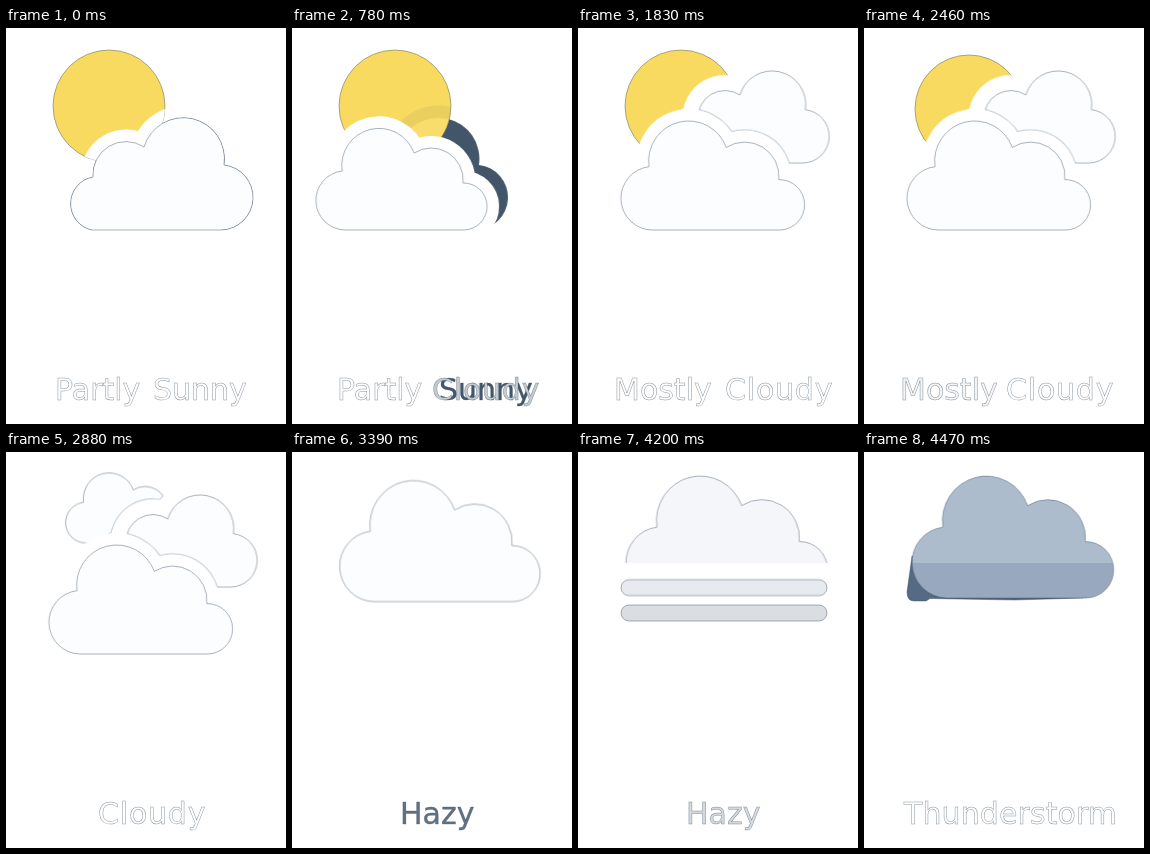
These frames come from a looping animation (280 by 396 pixels, 4500 ms). An HTML page:

```html
<!DOCTYPE html>
<html lang="en">
<head>
<meta charset="utf-8">
<title>Weather icons</title>
<style>
  html, body { margin: 0; width: 100%; height: 100%; overflow: hidden; background: #fff; }
  svg { display: block; width: 280px; height: 396px; }
  path, circle, rect { vector-effect: non-scaling-stroke; }
  .edge { stroke: #34495e; stroke-opacity: .6; stroke-width: .7; }
  text { font: 30px "DejaVu Sans", Verdana, sans-serif; stroke: #34495e; stroke-opacity: .6; stroke-width: .5; }
</style>
</head>
<body>
<svg viewBox="0 0 280 396">
  <defs>
    <clipPath id="inSun"><circle cx="103" cy="78" r="56"/></clipPath>
    <clipPath id="upper"><rect width="280" height="111"/></clipPath>
    <clipPath id="lower"><rect y="111" width="280" height="60"/></clipPath>
  </defs>
  <g id="low"></g>
  <g id="mid"></g>
  <g id="high"></g>
  <g id="haze"></g>
  <g id="words"></g>
</svg>
<script>
const LOOP = 4500, NAVY = '#34495e', WHITE = '#fff', SNOW = '#fcfdfe';
const [low, mid, high, haze, words, defs] =
  ['#low', '#mid', '#high', '#haze', '#words', 'defs'].map(s => document.querySelector(s));
const running = [];

function make(parent, tag, attrs = {}) {
  const el = document.createElementNS('http://www.w3.org/2000/svg', tag);
  for (const k in attrs) el.setAttribute(k, attrs[k]);
  return parent.appendChild(el);
}

// rows: [time in ms, value, easing towards the next row]
function anim(el, prop, ...rows) {
  // one row only at each end of the loop
  const start = rows.filter(r => r[0] === 0).pop() || [0, rows[0][1]];
  const end = rows.find(r => r[0] === LOOP) || [LOOP, rows[rows.length - 1][1]];
  const inner = rows.filter(r => r[0] > 0 && r[0] < LOOP);
  running.push(el.animate(
    [start, ...inner, end].map(([t, v, easing = 'linear']) => ({ offset: t / LOOP, [prop]: v, easing })),
    { duration: LOOP, iterations: Infinity, fill: 'both' }));
}

// times: on, off, on, off ... as hard switches
function show(el, ...times) {
  anim(el, 'opacity', ...times.flatMap((t, i) => [[t, i % 2], [t, 1 - i % 2]]));
}

function fade(el, [in0, in1, out0, out1]) {
  anim(el, 'opacity', [in0, 0], [in1, 1], [out0, 1], [out1, 0]);
}

const at = (x, y, sx = 1, sy = sx) => `translate(${x}px, ${y}px) scale(${sx}, ${sy})`;

// outline from its lower left, then arcs [radius, x, y]
const outline = (x, arcs) =>
  `M${x} 0` + arcs.map(([r, px, py]) => `A${r} ${r} 0 0 1 ${px} ${py}`).join('') + 'Z';
const peakRight = outline(27, [[27, 28, -53], [33, 79, -83], [41.1, 159, -65], [32.6, 156, 0]]);
const peakLeft = outline(30, [[29.6, 27, -59], [37.3, 99, -77], [32, 148, -47], [23.5, 149, 0]]);

// Navy body below the sun, white body above it, with a clear gap around
function cloud(id, d, times, poses, under) {
  const base = make(low, 'path', { d, fill: NAVY });
  const group = make(high, 'g');
  const clip = make(make(defs, 'clipPath', { id }), 'path', { d });
  const parts = [base, clip];
  let line;
  if (under) {
    const g = make(group, 'g', { 'clip-path': `url(#${under.id})` });
    line = make(g, 'path', { d, fill: 'none', stroke: '#9aa8b6', 'stroke-width': 25 });
    fade(line, under.times);
    parts.push(line);
  }
  const wrap = make(group, 'g');
  const ring = make(wrap, 'path', { d, fill: 'none', stroke: WHITE, 'stroke-width': 24 });
  parts.push(ring, make(group, 'path', { d, fill: SNOW, class: 'edge' }));
  parts.forEach(p => anim(p, 'transform', ...poses));
  fade(group, times);
  show(base, times[0], times[3]);
  return { id, times, wrap, ring, line };
}

const sun = make(mid, 'circle', { r: 56, fill: '#f9da60', class: 'edge' });
anim(sun, 'transform', [2250, at(103, 78), 'ease-in'], [2460, at(105, 81, .965), 'ease-in'],
  [2640, at(110, 90, 0)]);
show(sun, 0, 2640);

const first = cloud('first', peakRight, [0, 0, 600, 795],
  [[600, at(59, 202)], [780, at(28, 202)], [795, at(26, 202)]]);
first.wrap.setAttribute('clip-path', 'url(#inSun)');
anim(first.ring, 'stroke', [600, WHITE], [600, NAVY]);

const third = cloud('third', peakLeft, [2490, 2670, 3120, 3300],
  [[2490, at(33, 82, .69), 'ease-out'], [2820, at(59, 91, .69)],
   [3120, at(59, 91, .69)], [3300, at(55, 84, .69)]]);

const back = cloud('back', peakRight, [810, 990, 3120, 3330],
  [[810, at(139, 143, .65), 'ease-out'], [1170, at(129, 143, .65)],
   [1500, at(129, 143, .65), 'ease-in-out'], [1830, at(97, 135, .82)]], third);
// the gap widens as the cloud grows
anim(back.ring, 'strokeWidth', [1500, '24px'], [1830, '31px']);
anim(back.line, 'strokeWidth', [1500, '25px'], [1830, '32px']);

cloud('front', peakLeft, [600, 770, 3480, 3480],
  [[600, at(0, 202)], [780, at(23, 202), 'ease-out'], [1110, at(41, 202)],
   [1500, at(41, 202), 'ease-in-out'], [1830, at(42, 202, 1.073)],
   [3120, at(42, 202, 1.073), 'ease-in-out'], [3450, at(47, 146, 1.178, 1.2)]], back);

// Haze bars
function bar(y, start, tint, rows) {
  const el = make(haze, 'rect', { x: 43, y, width: 206, height: 16, rx: 8, class: 'edge' });
  anim(el, 'fill', [start, NAVY], [3660, tint], ...rows);
  return el;
}
const bar1 = bar(127, 3510, '#a6b6cb', [[3780, SNOW], [4170, SNOW], [4410, '#566b83']]);
const bar2 = bar(153, 3540, '#7890a4', [[3870, SNOW], [4170, SNOW], [4350, NAVY]]);
show(bar1, 3510, 4410);
show(bar2, 3540, 4350);
anim(bar1, 'transform', [4170, at(0, 0)], [4410, at(0, 5)]);

const wedge = make(haze, 'path', {
  d: 'M68 111H210Q203 113 202 118L197 126H82L84 123Q80 113 68 111Z', fill: '#344a62', class: 'edge' });
show(wedge, 3600, 3720);

const shade = make(haze, 'path', {
  d: 'M48 104L43 140Q43 149 50 149H62L66 146.5L150 148L219 146L200 110Z', fill: '#566b83', class: 'edge' });
show(shade, 4410, LOOP);

// The last cloud in two halves
function half(clip) {
  const g = make(haze, 'g', { 'clip-path': `url(#${clip})` });
  const el = make(g, 'path', { d: peakLeft, class: 'edge' });
  el.style.transform = at(47, 146, 1.178, 1.2);
  return el;
}
const lowerHalf = half('lower'), upperHalf = half('upper');
anim(lowerHalf, 'fill', [3480, SNOW], [3600, NAVY], [4260, NAVY], [4470, '#98a9bf']);
show(lowerHalf, 3480, 3600, 4260, LOOP);
anim(upperHalf, 'fill', [3480, SNOW], [4170, SNOW], [4470, '#adbccd']);
show(upperHalf, 3480, LOOP);

// Words fade between navy and white
function word(str, [in0, in1, out0, out1], moves, spacing = 0) {
  const el = make(words, 'text', { y: 372, 'letter-spacing': spacing });
  el.textContent = str;
  anim(el, 'fill', [in0, NAVY], [in1, WHITE], [out0, WHITE], [out1, NAVY]);
  show(el, in0, out1);
  anim(el, 'transform', ...moves.map(([t, x, e]) => [t, at(x, 0), e]));
}
word('Partly', [0, 0, 1500, 1680], [[600, 49, 'ease-out'], [900, 44]]);
word('Sunny', [0, 0, 600, 795], [[0, 147]]);
word('Mostly', [1590, 1830, 2450, 2640], [[0, 36]]);
word('Cloudy', [660, 830, 3120, 3300],
  [[600, 140], [1500, 140, 'ease-in-out'], [1830, 147], [2250, 147, 'ease-in'],
   [2460, 142, 'ease-in-out'], [2760, 92]], .8);
word('Hazy', [3330, 3600, 4170, 4320], [[0, 108]]);
word('Thunderstorm', [4260, 4450, LOOP, LOOP], [[0, 40]], .1);

const origin = document.timeline.currentTime || 0;
running.forEach(a => a.startTime = origin);
</script>
</body>
</html>
```
